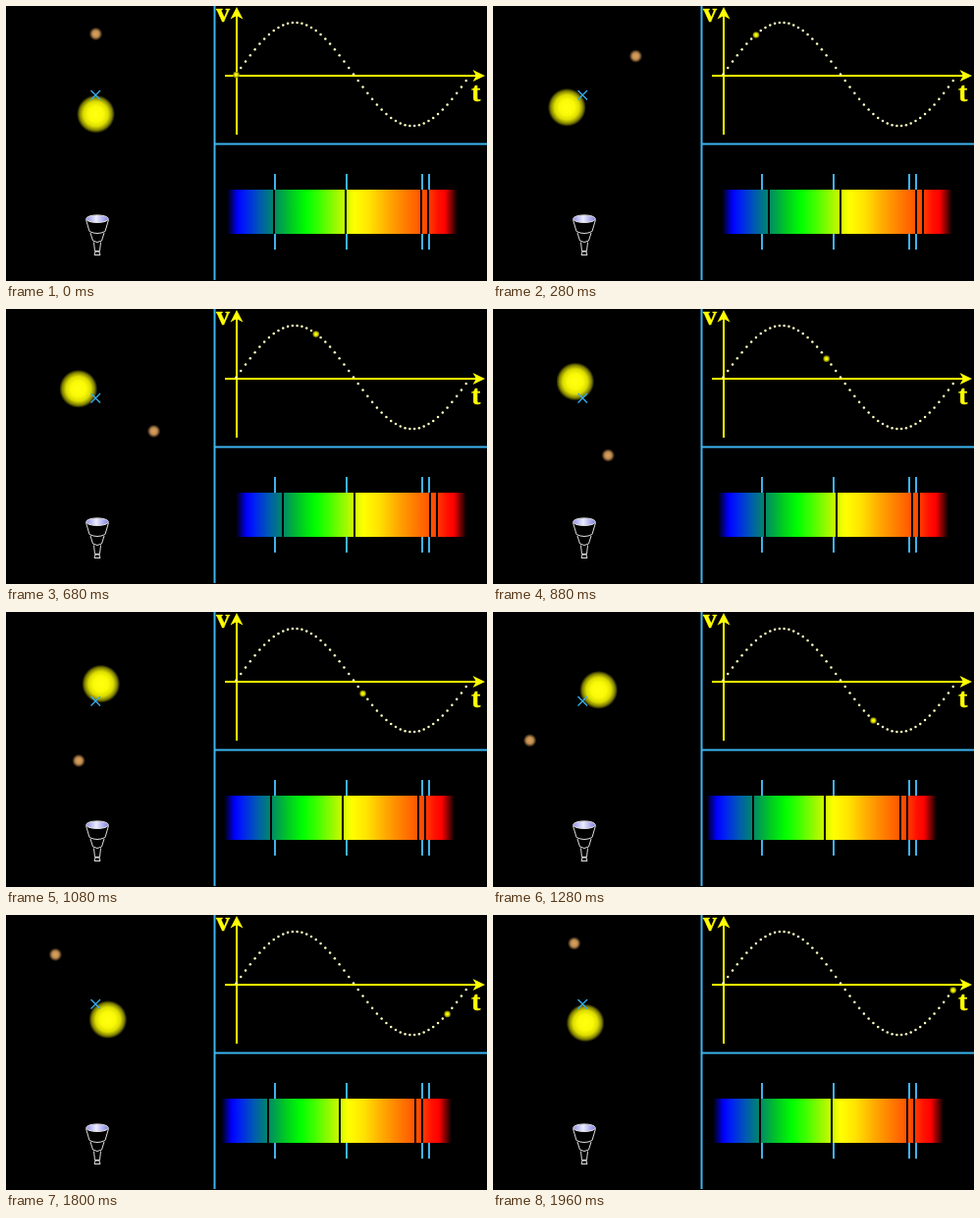
An HTML page for the animation above (2000 ms loop, 490 by 280 pixels).

```html
<!DOCTYPE html>
<html lang="en">
<head>
<meta charset="utf-8">
<title>Radial velocity</title>
<style>
  html, body { margin: 0; width: 100%; height: 100%; overflow: hidden; background: #000; }
  svg { display: block; width: 490px; height: 280px; }
  text { font: bold 28px "Liberation Serif", "Times New Roman", serif; fill: #ff0; stroke: #ff0; stroke-width: .4; }
</style>
</head>
<body>
<svg viewBox="0 0 490 280">
  <defs>
    <radialGradient id="sunFill">
      <stop offset="0" stop-color="#ffff10"/>
      <stop offset=".4" stop-color="#fafa08"/>
      <stop offset=".65" stop-color="#dcdc00"/>
      <stop offset=".85" stop-color="#808000"/>
      <stop offset="1" stop-color="#000"/>
    </radialGradient>
    <radialGradient id="planetFill">
      <stop offset="0" stop-color="#dca464"/>
      <stop offset=".5" stop-color="#c08c50"/>
      <stop offset="1" stop-color="#000"/>
    </radialGradient>
    <radialGradient id="markerFill">
      <stop offset=".3" stop-color="#ff0"/>
      <stop offset="1" stop-color="#6c6c00"/>
    </radialGradient>
    <linearGradient id="lensFill">
      <stop offset="0" stop-color="#9090e8"/>
      <stop offset=".45" stop-color="#ececff"/>
      <stop offset="1" stop-color="#8080e0"/>
    </linearGradient>
    <linearGradient id="bandFill" gradientUnits="userSpaceOnUse" x1="225" x2="461"></linearGradient>
  </defs>
  <rect width="490" height="280"/>

  <g id="telescope" fill="none" stroke="#e0e0e0">
    <path d="M81.5 217.5L85 229.5Q93 233.5 101 229.5L104.5 217.5"/>
    <path d="M86 231L88.5 239Q93 242 97.5 239L100 231"/>
    <path d="M89.5 240.5L90.5 249.5H95.5L96.5 240.5M90 253.5L91 250H95L96 253.5Z"/>
    <ellipse cx="93" cy="216.7" rx="11.3" ry="3.8" fill="url(#lensFill)"/>
  </g>
  <circle id="sun" r="19.5" fill="url(#sunFill)"/>
  <circle id="planet" r="6.8" fill="url(#planetFill)"/>
  <path d="M86.5 86L96 95.5M96 86L86.5 95.5" stroke="#38acec" stroke-width="1.4"/>

  <path d="M212.5 0V279M212 140.5H490" stroke="#3cb4f0" stroke-width="2"/>

  <path d="M235 7V131M223 71H482" stroke="#ff0" stroke-width="2"/>
  <path d="M235 1L241.5 13.5L235 10L228.5 13.5ZM488 71L475.5 77L479 71L475.5 65Z" fill="#ff0"/>
  <text x="214" y="16">v</text>
  <text x="474" y="97">t</text>
  <g id="curve" fill="#ffffc0"></g>
  <circle id="marker" r="3.3" fill="url(#markerFill)"/>

  <path id="ticks" stroke="#40b2ec" stroke-width="2"/>
  <g id="spectrum">
    <rect x="225" y="187" width="236" height="45" fill="url(#bandFill)"/>
    <path id="absorption" stroke="#000" stroke-width="2"/>
  </g>
</svg>
<script>
const STEPS = 50, STEP_MS = 40;
const REST_TICKS = [274, 347, 424, 431];
const DARK_LINES = [273, 346, 423, 430];
const BAND = [
  [225, '#000'], [236, '#00f'], [244, '#0020f4'], [258, '#0058b4'], [273, '#008868'],
  [290, '#00c824'], [306, '#0f0'], [320, '#40ff00'], [338, '#a4f800'], [355, '#ff0'],
  [370, '#ffe400'], [390, '#ffa800'], [410, '#ff7400'], [428, '#ff4800'],
  [440, '#ff1000'], [447, '#f00'], [460, '#000']
];
const $ = id => document.getElementById(id);

function add(parent, name, attrs) {
  const node = document.createElementNS('http://www.w3.org/2000/svg', name);
  for (const key in attrs) node.setAttribute(key, attrs[key]);
  parent.appendChild(node);
}

function place(id, x, y) {
  $(id).setAttribute('transform', `translate(${x} ${y})`);
}

const phase = step => 2 * Math.PI * step / STEPS;
const curveX = step => 234.5 + 4.78 * step;
const curveY = step => 69.5 - 52.6 * Math.sin(phase(step));

for (const [x, color] of BAND) {
  add($('bandFill'), 'stop', { offset: (x - 225) / 236, 'stop-color': color });
}
for (let i = 0; i < STEPS; i++) {
  add($('curve'), 'circle', { cx: curveX(i), cy: curveY(i), r: 1.25 });
}
$('ticks').setAttribute('d', REST_TICKS.map(x => `M${x} 171V187M${x} 232V248`).join(''));
$('absorption').setAttribute('d', DARK_LINES.map(x => `M${x} 187V232`).join(''));

function draw(time) {
  const step = Math.floor(time / STEP_MS) % STEPS;
  const sin = Math.sin(phase(step)), cos = Math.cos(phase(step));
  place('planet', 91.5 + 70 * sin, 90.9 - 62.5 * cos);
  place('sun', 91.5 - 21 * sin, 91.3 + 18.7 * cos);
  place('marker', curveX(step), curveY(step) + 0.5);
  place('spectrum', Math.round(10.3 * sin), 0);
}

let start;
function tick(now) {
  start ??= now;
  draw(now - start);
  requestAnimationFrame(tick);
}
draw(0);
requestAnimationFrame(tick);
</script>
</body>
</html>
```
